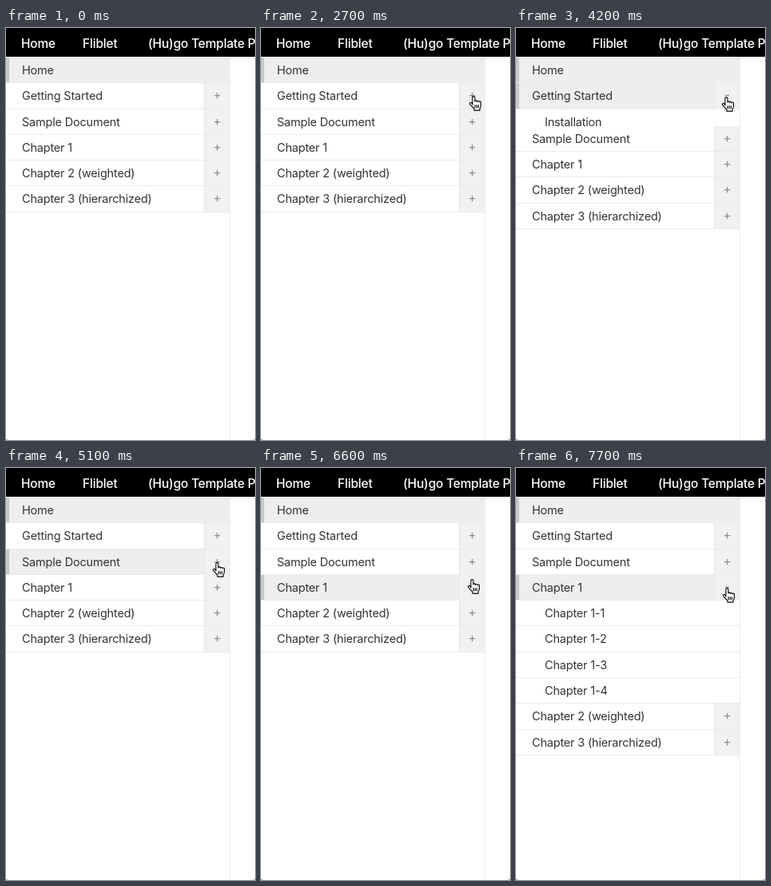
Animation of 312 by 516 pixels, one loop 8000 ms. Source, as an HTML page:

```html
<!DOCTYPE html>
<html lang="en">
<head>
<meta charset="utf-8">
<title>Sidebar menu</title>
<style>
  html, body { margin: 0; width: 100%; height: 100%; overflow: hidden; background: #888; }
  #stage {
    position: relative; width: 312px; height: 516px; overflow: hidden;
    background: #fff; border-radius: 0 0 3px 3px;
    font: 14.5px/32.3px Inter, "Noto Sans", sans-serif; letter-spacing: -.19px;
    color: #333; white-space: nowrap;
  }
  header { position: absolute; z-index: 1; width: 100%; height: 36px; background: #000; }
  header span {
    position: absolute; top: 1.5px; line-height: 36px;
    color: #fff; font-size: 15.5px; font-weight: 500;
  }
  nav {
    position: absolute; top: 0; left: 0; width: 280px; height: 480px;
    padding-top: 36.92px; border-right: 1px solid #ececec;
  }
  .row {
    position: relative; box-sizing: border-box; height: 32.3px; padding-left: 20px;
    border-bottom: 1px solid #ebebeb;
  }
  .row.on { background: #eee; box-shadow: inset 4px 0 #c8c8c8; }
  .kids { overflow: hidden; height: 0; }
  .kids .row { padding-left: 36px; }
  .sign {
    position: absolute; left: 248px; top: 0; width: 31px; height: 100%;
    border-left: 1px solid #e6e6e6; background: #f1f1f1;
    color: #8c8c8c; font-size: 15.5px; text-align: center; line-height: 29.2px;
  }
  #cursor { position: absolute; z-index: 2; left: 0; top: 0; overflow: visible; }
</style>
</head>
<body>
<div id="stage">
  <header>
    <span style="left:19px">Home</span>
    <span style="left:96px">Fliblet</span>
    <span style="left:178px">(Hu)go Template Primer</span>
  </header>
  <nav></nav>
  <svg id="cursor" width="1" height="1" stroke-linejoin="round" stroke-linecap="round">
    <path id="arrow" d="M0 0V15L3.4 11.8L5.8 17.4L8.2 16.4L5.8 11H10.4Z" fill="#000" stroke="#fff"/>
    <g id="hand" transform="translate(-6.5 -.5)" stroke="#000" stroke-width="1.1">
      <path fill="#fff" d="M4.5 11.5V2.6a1.5 1.5 0 0 1 3 0V7.5a1.3 1.3 0 0 1 2.6 .3a1.3 1.3 0 0 1 2.5 .6a1.2 1.2 0 0 1 2.4 .8V12.5q0 2-1.3 3.8V18.6H6.5V16.5Q4.5 14.5 1.2 10.8a1.4 1.4 0 0 1 2-1.8Z"/>
      <path fill="none" d="M7.7 12v3.2M9.8 12v3.2M11.9 12v3.2"/>
    </g>
  </svg>
</div>
<script>
const LOOP = 8000, STEP = 100, ROW = 32.3, SLIDE = 250;

// hover: [from, to], open and close: start of each slide
const menu = [
  { name: 'Home', hover: [0, LOOP] },
  { name: 'Getting Started', kids: ['Installation', 'Configuration'],
    hover: [2800, 4800], open: 3085, close: 4047 },
  { name: 'Sample Document', kids: ['Build-in Shortcodes', 'Custom Shortcodes'],
    hover: [4800, 6500], open: 5140, close: 6050 },
  { name: 'Chapter 1', kids: ['Chapter 1-1', 'Chapter 1-2', 'Chapter 1-3', 'Chapter 1-4'],
    hover: [6500, LOOP], open: 7450, close: LOOP },
  { name: 'Chapter 2 (weighted)', kids: [] },
  { name: 'Chapter 3 (hierarchized)', kids: [] }
];

// time, x, y of the pointer's hot spot
const path = [
  [100, 300, 517], [800, 270, 71], [1000, 269, 75], [1300, 267, 85], [2700, 267, 85],
  [3000, 264, 86], [4500, 264, 86], [5000, 265, 118], [6300, 265, 118],
  [6600, 265, 139], [6800, 265, 150]
];

const $ = id => document.getElementById(id);
const nav = document.querySelector('nav');

function add(parent, cls, text = '') {
  const el = document.createElement('div');
  el.className = cls;
  el.textContent = text;
  return parent.appendChild(el);
}

for (const item of menu) {
  item.row = add(nav, 'row', item.name);
  if (!item.kids) continue;
  item.sign = add(item.row, 'sign', '+');
  item.box = add(nav, 'kids');
  item.kids.forEach(name => add(item.box, 'row', name));
}

const clamp = p => Math.min(1, Math.max(0, p));
const swing = p => .5 - Math.cos(Math.PI * clamp(p)) / 2;

function pointerAt(t) {
  const i = path.findIndex(p => p[0] > t);
  if (i < 0) return path[path.length - 1].slice(1);
  if (i === 0) return path[0].slice(1);
  const [t0, x0, y0] = path[i - 1], [t1, x1, y1] = path[i];
  const p = swing((t - t0) / (t1 - t0));
  return [x0 + (x1 - x0) * p, y0 + (y1 - y0) * p];
}

function draw(t) {
  for (const { row, sign, box, kids, hover, open, close } of menu) {
    row.classList.toggle('on', !!hover && t >= hover[0] && t < hover[1]);
    if (!open) continue;
    const shown = swing((t - open) / SLIDE) - swing((t - close) / SLIDE);
    box.style.height = shown * kids.length * ROW + 'px';
    sign.textContent = shown > 0 ? '-' : '+';
  }
  const [x, y] = pointerAt(t), hand = t >= 1100;
  $('cursor').style.transform = `translate(${Math.round(x)}px, ${Math.round(y)}px)`;
  $('cursor').style.visibility = t < 100 ? 'hidden' : 'visible';
  $('arrow').style.display = hand ? 'none' : '';
  $('hand').style.display = hand ? '' : 'none';
}

const start = performance.now();
function tick() {
  const t = (performance.now() - start) % LOOP;
  draw(Math.floor(t / STEP) * STEP);
  requestAnimationFrame(tick);
}
tick();
</script>
</body>
</html>
```
